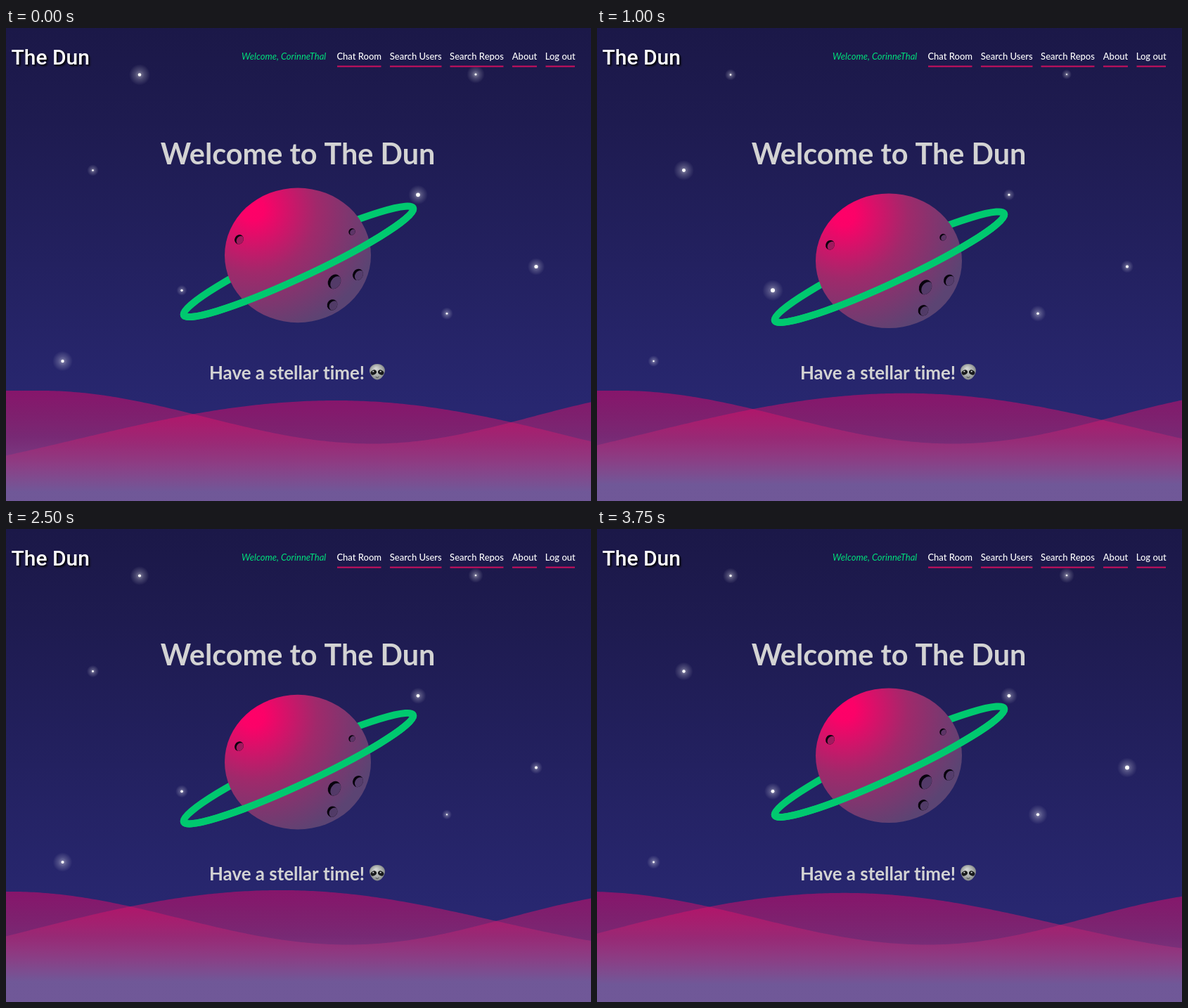
Write an HTML page with a canvas that moves like this. It is 832 px wide and 673 px high and loops after 4000 ms.

```html
<!DOCTYPE html>
<html lang="en">
<head>
<meta charset="utf-8">
<title>Space welcome page</title>
<style>
  html, body { margin: 0; width: 100%; height: 100%; overflow: hidden; background: #1b1849; }
  canvas { display: block; width: 832px; height: 673px; }
</style>
</head>
<body>
<canvas id="stage" width="832" height="673"></canvas>
<script>
const W = 832, H = 673, LOOP = 4, STEP = 0.25, TAU = Math.PI * 2;
const ctx = document.getElementById('stage').getContext('2d');

// x, y, time of full brightness, dot radius min/max, glow radius min/max
const STARS = [
  [190, 66.5, 0, 1.2, 2.3, 8, 15],
  [668, 66, -0.15, 0.9, 1.6, 7, 13],
  [123.5, 202.5, 1.2, 1.3, 2.6, 8, 15],
  [586, 237.3, -0.15, 1.5, 2.9, 8, 14],
  [754, 339.5, 1.75, 1.7, 3, 7.5, 14.5],
  [250, 373.3, 1.1, 1.6, 3, 7.5, 15],
  [627, 406.3, 1.45, 1.1, 2.2, 7, 14],
  [80.5, 474, 0.1, 1.1, 2.2, 7.5, 14.5]
];
const TWINKLE = 2.17;

// centre relative to the planet, radii, inner colour
const CRATERS = [
  [-83.5, -22.5, 6.2, 7, '#a01a5f'],
  [77, -33.5, 4.6, 5, '#5d3567'],
  [52, 37.5, 8.8, 10.8, '#533a68'],
  [85.5, 27.5, 7.2, 8.3, '#553d6c'],
  [49, 70.5, 7.2, 7.8, '#513b67']
];

const LINKS = [
  ['Chat Room', 471, 533.5], ['Search Users', 546, 619.5], ['Search Repos', 631.5, 707.5],
  ['About', 720, 755], ['Log out', 767.5, 809]
];

const mix = (a, b, k) => a + (b - a) * k;

function vertical(y0, y1, ...stops) {
  const g = ctx.createLinearGradient(0, y0, 0, y1);
  stops.forEach(([at, color]) => g.addColorStop(at, color));
  return g;
}

function oval(x, y, rx, ry, color, turn = 0) {
  ctx.fillStyle = color;
  ctx.beginPath();
  ctx.ellipse(x, y, rx, ry, turn, 0, TAU);
  ctx.fill();
}

function text(str, x, y, font, color, align = 'left', family = 'Lato') {
  ctx.font = `${font} ${family}, sans-serif`;
  ctx.fillStyle = color;
  ctx.textAlign = align;
  ctx.fillText(str, x, y);
}

function drawStar([x, y, peak, dot0, dot1, glow0, glow1], t) {
  const k = 0.5 + 0.5 * Math.cos(TAU * (t - peak) / TWINKLE);
  const r = mix(glow0, glow1, k);
  const g = ctx.createRadialGradient(x, y, 0, x, y, r);
  g.addColorStop(0, 'rgba(255,255,255,.45)');
  g.addColorStop(0.45, 'rgba(255,255,255,.19)');
  g.addColorStop(1, 'rgba(255,255,255,0)');
  oval(x, y, r, r, g);
  const d = mix(dot0, dot1, k);
  oval(x, y, d, d, '#fff');
}

function ring(from, to) {
  ctx.save();
  ctx.translate(1, 9);
  ctx.transform(1, -0.458, 0, 1, 0, 0);
  ctx.beginPath();
  ctx.ellipse(0, 0, 163.3, 24.7, 0, from, to);
  ctx.restore();
  ctx.strokeStyle = '#00c96f';
  ctx.lineWidth = 10;
  ctx.stroke();
}

function drawPlanet(t) {
  ctx.save();
  ctx.translate(415, 327.5 + 6.7 * Math.cos(TAU * (t - 1.78) / 5));
  ring(0, TAU);
  const g = ctx.createRadialGradient(-64, -66, 0, -64, -66, 182);
  g.addColorStop(0, '#ff0068');
  g.addColorStop(0.09, '#fb0268');
  g.addColorStop(0.5, '#a0296b');
  g.addColorStop(1, '#5b4473');
  oval(0, 0, 104, 95.8, g);
  for (const [x, y, rx, ry, color] of CRATERS) {
    oval(x, y, rx, ry, '#08030d', 0.5);
    ctx.save();
    ctx.beginPath();
    ctx.ellipse(x, y, rx, ry, 0.5, 0, TAU);
    ctx.clip();
    oval(x + rx * 0.36, y + ry * 0.22, rx * 0.95, ry * 0.95, color, 0.5);
    ctx.restore();
  }
  ring(0, Math.PI);
  ctx.restore();
}

// Filled hill whose edge follows a cosine, with its own span and height on each side.
function hill(x0, y0, left, right, dir, top) {
  ctx.beginPath();
  ctx.moveTo(0, H);
  for (let x = 0; x <= W; x += 4) {
    const [span, amp] = x < x0 ? left : right;
    const turn = Math.min(1, Math.abs(x - x0) / span);
    ctx.lineTo(x, y0 + dir * amp * (1 - Math.cos(Math.PI * turn)));
  }
  ctx.lineTo(W, H);
  ctx.fillStyle = vertical(top, top + 130,
    [0, 'rgba(255,0,102,.44)'], [0.25, 'rgba(212,23,107,.5)'],
    [0.5, 'rgba(172,42,118,.6)'], [1, 'rgba(112,88,152,.95)']);
  ctx.fill();
}

function drawHills(t) {
  hill(521 - 13.4 * t, 591.5, [474 + 3.3 * t, 37.8], [452, 38], -1, 516);
  const top = 530 - 12.8 * t + 2.55 * t * t;
  hill(470 - 31.5 * t, top, [750, 56.5 + 2 * t],
    [705 - 50 * t + 5.7 * t * t, 56 - 7.3 * t + 1.05 * t * t], 1, top);
}

function drawAlien(x, y) {
  const g = ctx.createRadialGradient(x - 2, y - 5, 1, x, y, 13);
  g.addColorStop(0, '#d2d5d3');
  g.addColorStop(0.6, '#a6aaa8');
  g.addColorStop(1, '#747978');
  ctx.fillStyle = g;
  ctx.beginPath();
  ctx.moveTo(x, y - 11.5);
  ctx.bezierCurveTo(x + 9, y - 11.5, x + 13, y - 4, x + 10, y + 2);
  ctx.bezierCurveTo(x + 8, y + 7, x + 4, y + 11, x, y + 11);
  ctx.bezierCurveTo(x - 4, y + 11, x - 8, y + 7, x - 10, y + 2);
  ctx.bezierCurveTo(x - 13, y - 4, x - 9, y - 11.5, x, y - 11.5);
  ctx.fill();
  for (const side of [-1, 1]) {
    oval(x + side * 5.2, y + 0.5, 4.4, 3.3, '#17191b', -side * -0.55);
    oval(x + side * 5.2 - 0.5, y - 0.8, 1.1, 0.9, '#dfe3e3');
  }
  ctx.strokeStyle = '#3e4342';
  ctx.lineWidth = 1;
  ctx.beginPath();
  ctx.arc(x, y + 5, 2.8, 0.5, Math.PI - 0.5);
  ctx.stroke();
}

function drawText() {
  ctx.letterSpacing = '0.01px'; // keeps letters unjoined
  ctx.save();
  ctx.shadowColor = '#000';
  ctx.shadowOffsetX = ctx.shadowOffsetY = 2;
  ctx.shadowBlur = 3;
  text('The Dun', 7.5, 52, '500 30px', '#fff', 'left', 'Roboto');
  ctx.restore();

  text('Welcome, CorinneThal', 335, 45, 'italic 13px', '#00df7b');
  for (const [label, x0, x1] of LINKS) {
    text(label, (x0 + x1) / 2, 45, '500 13px', '#fff', 'center');
    ctx.fillStyle = '#cc0f5d';
    ctx.fillRect(x0, 53.6, x1 - x0, 2);
  }
  text('Welcome to The Dun', 219.8, 194, 'bold 41.4px', '#d3d3d3');
  text('Have a stellar time!', 289, 499.5, 'bold 25.9px', '#d3d3d3');
  drawAlien(528, 489.5);
}

function draw(t) {
  ctx.fillStyle = vertical(0, H, [0, '#1b1848'], [0.2, '#1e1b50'], [0.8, '#282770'], [1, '#2a2975']);
  ctx.fillRect(0, 0, W, H);
  STARS.forEach(star => drawStar(star, t));
  drawPlanet(t);
  drawHills(t);
  drawText();
}

const start = performance.now();
function frame() {
  const t = ((performance.now() - start) / 1000) % LOOP;
  draw(Math.floor(t / STEP) * STEP);
  requestAnimationFrame(frame);
}
frame();
</script>
</body>
</html>
```
